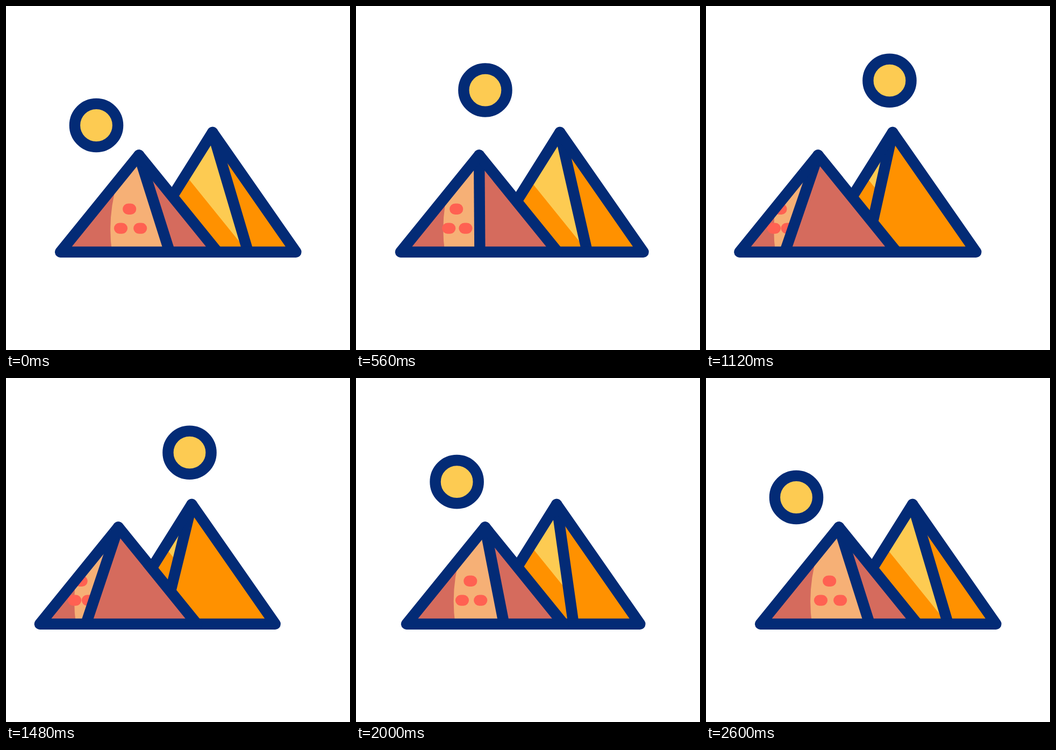
Animation, 640 px wide and 640 px high, one loop 2.84 s. Source, as an HTML page without scripts:

```html
<!DOCTYPE html>
<html lang="en">
<head>
<meta charset="utf-8">
<title>Pyramids</title>
<style>
  /* progress of the near pyramid, the far pyramid and the sun */
  @property --near { syntax: "<number>"; inherits: true; initial-value: 0; }
  @property --far { syntax: "<number>"; inherits: true; initial-value: 0; }
  @property --sun { syntax: "<number>"; inherits: true; initial-value: 0; }

  html, body { margin: 0; width: 100%; height: 100%; overflow: hidden; background: #fff; }

  svg {
    display: block;
    width: 100%;
    height: 100%;
    animation: near 2840ms cubic-bezier(.31, 0, .33, 1) infinite,
               far 2840ms cubic-bezier(.34, 0, .11, 1) infinite,
               sun 2840ms cubic-bezier(.41, 0, .23, 1) infinite;
  }
  @keyframes near {
    0%, 7.042% { --near: 0; }
    43.662%, 49.296% { --near: 1; }
    85.915%, 100% { --near: 0; }
  }
  @keyframes far {
    0%, 14.085% { --far: 0; }
    49.296%, 56.338% { --far: 1; }
    91.549%, 100% { --far: 0; }
  }
  @keyframes sun {
    0%, 7.042% { --sun: 0; }
    42.254%, 50.704% { --sun: 1; }
    85.915%, 100% { --sun: 0; }
  }

  .line {
    fill: none;
    stroke: #032b76;
    stroke-width: 20.4px;
    stroke-linejoin: round;
    stroke-linecap: round;
    vector-effect: non-scaling-stroke;
  }
  .sun {
    fill: #fdcb52;
    offset-path: path("M168 222C195 168 255 138.7 342.3 138.7");
    offset-distance: calc(var(--sun) * 100%);
    offset-rotate: 0deg;
  }

  .near { transform: translateX(calc(var(--near) * -39.2px)); }
  .far { transform: translateX(calc(var(--far) * -38.7px)); }

  /* the ridge swings around the apex */
  .near .ridge { transform: matrix(1, 0, calc(.317 - .667 * var(--near)), 1, 0, 0); }
  .far .ridge { transform: matrix(1, 0, calc(.297 - .5415 * var(--far)), 1, 0, 0); }

  .slide { transform: translateX(calc(var(--near) * var(--by))); }
  .cast { transform: translateX(calc(var(--far) * 38.7px - var(--near) * 39.2px)); }

  .sand { fill: #f6b076; }
  .clay { fill: #d56b5d; }
  .stone { fill: #ff6152; }
  .gold { fill: #fdcb52; }
  .amber { fill: #ff9100; }
</style>
</head>
<body>
<svg viewBox="0 0 640 640">
  <defs>
    <path id="farShape" d="M0 0L-139.8 222.7H155.2Z"/>
    <path id="nearShape" d="M0 0L-146.2 180.2H146.2Z"/>
    <clipPath id="farClip"><use href="#farShape"/></clipPath>
    <clipPath id="nearClip"><use href="#nearShape"/></clipPath>
    <rect id="stone" x="-12.6" y="-10.2" width="25.2" height="20.4" rx="10.2"/>
  </defs>

  <circle class="line sun" r="40.1"/>

  <g transform="translate(384.3 235)">
    <g class="far">
      <g clip-path="url(#farClip)">
        <use href="#farShape" class="gold"/>
        <path class="amber cast" d="M-82.3 40L65.4 222.7H-200V40Z"/>
        <rect class="amber ridge" width="320" height="222.7"/>
      </g>
      <path class="line ridge" d="M0 0V222.7"/>
      <use href="#farShape" class="line"/>
    </g>
  </g>

  <g transform="translate(247.3 277.5)">
    <g class="near">
      <g clip-path="url(#nearClip)">
        <use href="#nearShape" class="sand"/>
        <path class="clay slide" style="--by:-29.5px" d="M-40 50Q-59.5 115 -50 181H-200V50Z"/>
        <g class="stone">
          <g class="slide" style="--by:-53.5px"><use href="#stone" x="-17.6" y="100.3"/></g>
          <g class="slide" style="--by:-48.7px"><use href="#stone" x="-33.8" y="136.1"/></g>
          <g class="slide" style="--by:-59.4px"><use href="#stone" x="2.4" y="136.1"/></g>
        </g>
        <rect class="clay ridge" width="300" height="180.2"/>
      </g>
      <path class="line ridge" d="M0 0V180.2"/>
      <use href="#nearShape" class="line"/>
    </g>
  </g>
</svg>
</body>
</html>
```
